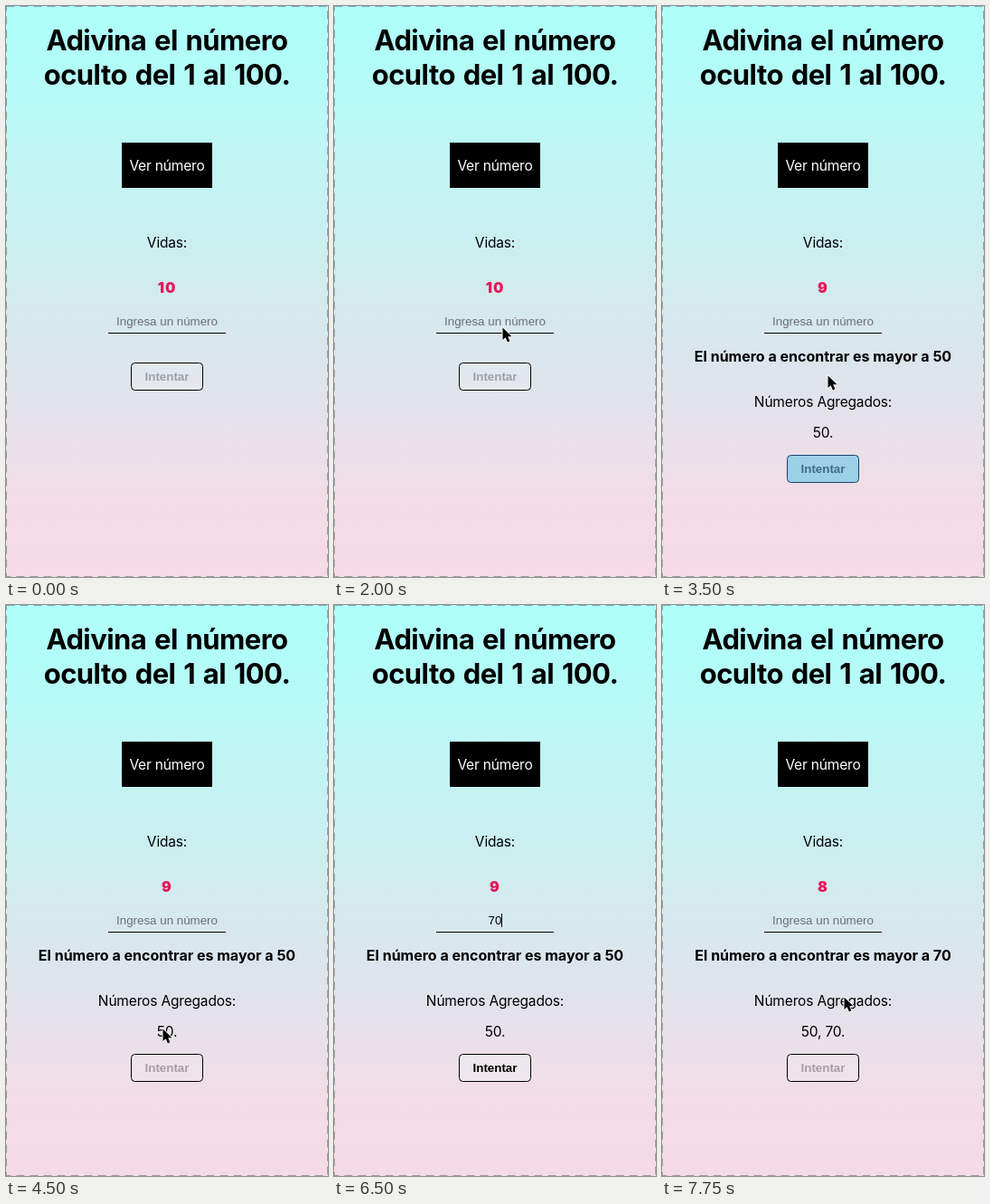
Animation, 356 px wide and 631 px high, one loop 8 s. Source, as an HTML page with a canvas:

```html
<!DOCTYPE html>
<html lang="es">
<head>
<meta charset="utf-8">
<title>Adivina el número</title>
<style>
  html, body { margin: 0; width: 100%; height: 100%; overflow: hidden; }
  canvas { display: block; width: 356px; height: 631px; }
</style>
</head>
<body>
<canvas id="stage"></canvas>
<script>
const W = 356, H = 631, CX = 178, LOOP = 8000, STEP = 250;
const UI = 'Inter, "Open Sans", sans-serif';
const FORM = '"Liberation Sans", Arial, sans-serif';

const canvas = document.getElementById('stage');
const ctx = canvas.getContext('2d');
const ratio = window.devicePixelRatio || 1;
canvas.width = W * ratio;
canvas.height = H * ratio;
ctx.scale(ratio, ratio);
ctx.textAlign = 'center';

// Pointer runs: [start, end, from, to]; it rests at the end of each run.
const pointerRuns = [
  [500, 1000, [296, 350], [186, 355]],
  [3000, 3500, [183, 407], [183, 408]],
  [3500, 4000, [183, 408], [176, 509]],
  [4250, 5000, [176, 509], [166, 350]],
  [6750, 7000, [184, 500], [183, 510]],
  [7250, 7750, [183, 510], [201, 433]]
];
const hiddenSpans = [[0, 500], [2250, 3000], [6250, 6750]];
const caretSpans = [[1250, 1750], [2250, 3000], [5250, 5750], [6250, 6750]];

const within = spans => t => spans.some(([a, b]) => t >= a && t < b);
const pointerHidden = within(hiddenSpans);
const caretShown = within(caretSpans);
const clamp = v => Math.max(0, Math.min(1, v));
const ease = v => v * v * (3 - 2 * v);

function typedAt(t) {
  if (t >= 2250 && t < 3500) return t < 2500 ? '5' : '50';
  if (t >= 6250 && t < 7250) return t < 6500 ? '7' : '70';
  return '';
}

// Blue tint of the button: on while hovered, fading after each submit.
function tintAt(t) {
  if (t >= 3000 && t < 4000) return 1 - clamp((t - 3500) / 400);
  if (t >= 6750) return 1 - clamp((t - 7250) / 400);
  return 0;
}

function text(str, y, size, { weight = 400, family = UI, color = '#000', tracking = 0, gap = 0 } = {}) {
  ctx.font = `${weight} ${size}px ${family}`;
  ctx.letterSpacing = `${tracking}em`;
  ctx.wordSpacing = `${gap}em`;
  ctx.fillStyle = color;
  ctx.fillText(str, CX, y);
}

const label = (str, y, color) => text(str, y, 15.5, { color, tracking: -0.011 });

function drawBackground() {
  const g = ctx.createLinearGradient(0, 0, 0, H);
  [[0, '#adfffb'], [0.1, '#b2fcf8'], [0.41, '#cbeff0'], [0.63, '#dce5ed'],
   [0.87, '#f3dce6'], [1, '#f6dae6']].forEach(([p, c]) => g.addColorStop(p, c));
  ctx.fillStyle = g;
  ctx.fillRect(0, 0, W, H);

  ctx.save();
  ctx.strokeStyle = 'rgba(95,110,115,.6)';
  ctx.lineWidth = 1;
  ctx.setLineDash([9, 6]);
  ctx.strokeRect(0.5, 0.5, W - 1, H - 1);
  ctx.restore();
}

function drawHeader(lives) {
  const title = { weight: 700, tracking: -0.018, gap: 0.065 };
  text('Adivina el número', 49, 31, title);
  text('oculto del 1 al 100.', 87, 31, title);
  ctx.fillStyle = '#000';
  ctx.fillRect(128, 151, 100, 50);
  label('Ver número', 182, '#fff');
  label('Vidas:', 267);
  text(lives, 317, 16, { weight: 900, color: '#e91558', tracking: 0.06 });
}

function drawField(typed, caret) {
  const size = 13.333;
  if (typed) text(typed, 353, size, { family: FORM });
  else text('Ingresa un número', 353, size, { family: FORM, color: '#6c6f71' });
  ctx.fillStyle = '#000';
  ctx.fillRect(113, 361, 130, 1);
  if (caret) {
    const x = typed ? Math.floor(CX + ctx.measureText(typed).width / 2) : CX;
    ctx.fillRect(x, 341, 1, 15);
  }
}

function drawButton(y, enabled, tint) {
  ctx.beginPath();
  ctx.roundRect(138.5, y + 0.5, 79, 30, 4);
  ctx.fillStyle = `rgba(239,239,239,${enabled ? 0.6 : 0.3})`;
  ctx.fill();
  ctx.fillStyle = `rgba(153,208,232,${0.96 * tint})`;
  ctx.fill();
  ctx.lineWidth = 1;
  ctx.strokeStyle = `rgb(${20 * tint},${70 * tint},${105 * tint})`;
  ctx.stroke();
  const color = enabled ? '#000' : tint > 0.5 ? '#3f6d84' : 'rgba(16,16,16,.32)';
  text('Intentar', y + 20, 13.333, { weight: 700, family: FORM, color });
}

function drawPointer(t) {
  if (pointerHidden(t)) return;
  const run = pointerRuns.filter(r => r[0] <= t).pop();
  const [start, end, from, to] = run;
  const k = ease(clamp((t - start) / (end - start)));
  ctx.save();
  ctx.translate(...from.map((v, i) => Math.round(v + (to[i] - v) * k)));
  ctx.beginPath();
  [[0.5, 0.5], [0.5, 14], [3.6, 11.2], [5.9, 16.4], [8.4, 15.3], [6.2, 10.3], [10.5, 10.3]]
    .forEach(p => ctx.lineTo(...p));
  ctx.closePath();
  ctx.lineJoin = 'round';
  ctx.lineWidth = 1.8;
  ctx.strokeStyle = '#fff';
  ctx.stroke();
  ctx.fillStyle = '#000';
  ctx.fill();
  ctx.restore();
}

function draw(now) {
  const t = Math.floor((now % LOOP) / STEP) * STEP;
  const tries = t < 3500 ? [] : t < 7250 ? [50] : [50, 70];
  const typed = typedAt(t);

  drawBackground();
  drawHeader(String(10 - tries.length));
  drawField(typed, caretShown(t));
  if (tries.length) {
    text(`El número a encontrar es mayor a ${tries[tries.length - 1]}`, 393, 16, { weight: 700 });
    label('Números Agregados:', 443);
    label(tries.join(', ') + '.', 477);
  }
  drawButton(tries.length ? 496 : 394, typed !== '', tintAt(t));
  drawPointer(t);
}

const began = performance.now();
function tick() {
  draw(performance.now() - began);
  requestAnimationFrame(tick);
}
tick();
</script>
</body>
</html>
```
